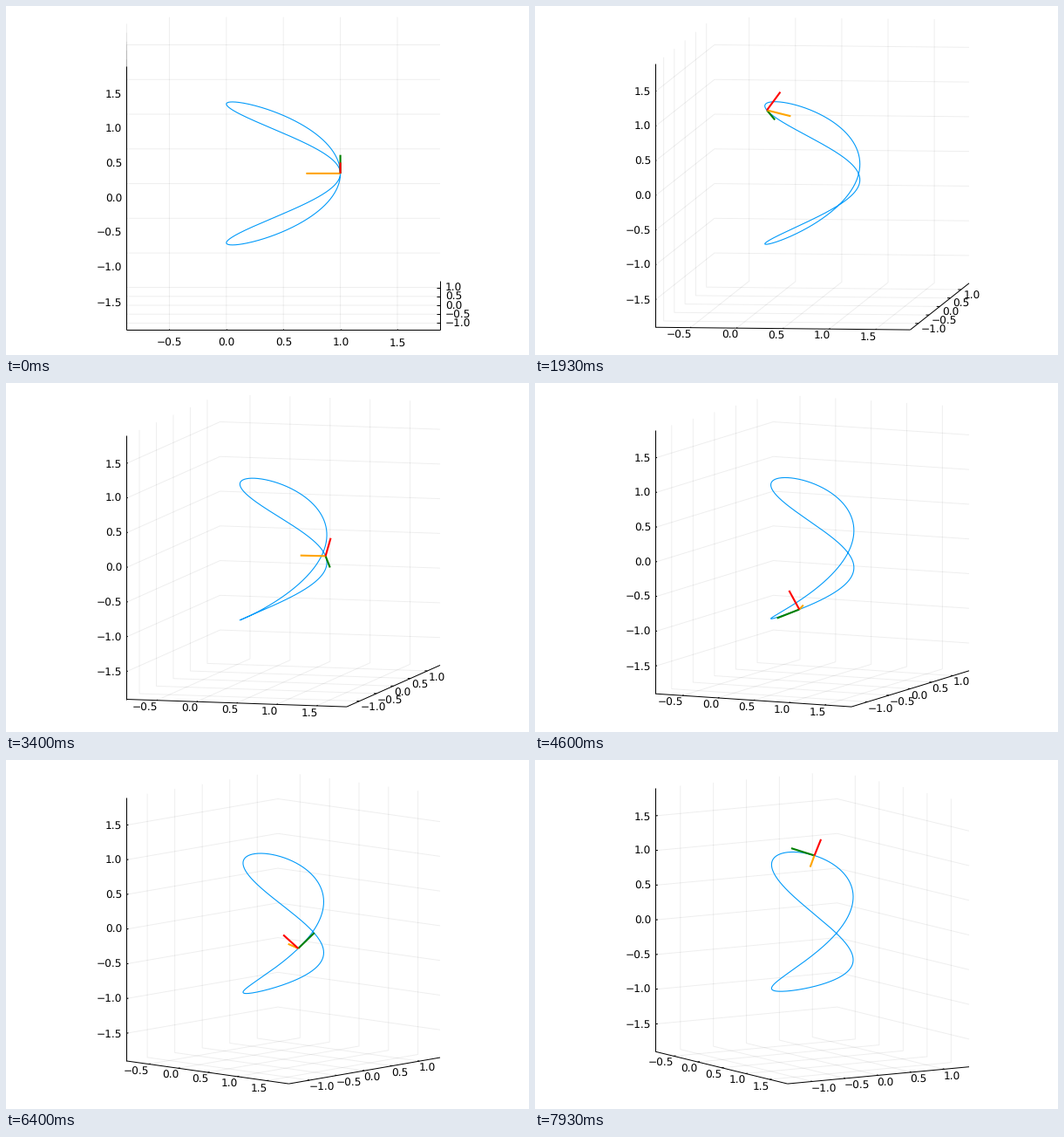
These frames come from a looping animation (600 by 400 pixels, 8000 ms). A matplotlib script:

```python
import numpy as np
import matplotlib.pyplot as plt
from matplotlib.animation import FuncAnimation
from matplotlib.collections import LineCollection

W, H, DPI = 600, 400, 100
LOOP, TICK = 8000, 20           # ms
POSES = 120                     # distinct poses shown in one loop
FULL = 199                      # steps of the complete quarter turn
LO = np.array([-0.875, -1.375, -1.9])
HI = np.array([1.875, 1.375, 1.9])
LEFT, RIGHT, BOTTOM = 138.4, 498.0, 371.1
DEPTH, RISE = 56.2, 302.2       # pixel heights of the floor and of the z axis
FONT = 12.1
TICKS = [np.arange(-1, 4) / 2, np.arange(-2, 3) / 2, np.arange(-3, 4) / 2]

plt.rcParams["font.family"] = "DejaVu Sans"
plt.rcParams["text.hinting"] = "none"


def px(n):
    return n * 72 / DPI


def project(pts, az):
    u = (np.asarray(pts, float) - LO) / (HI - LO)
    x, y, z = u[..., 0], u[..., 1], u[..., 2]
    c, s = np.cos(az), np.sin(az)
    sx = LEFT + (RIGHT - LEFT) * (x * c + y * s) / (c + s)
    sy = BOTTOM - DEPTH * (y * c * c + (1 - x) * s * s) - RISE * z
    return np.stack([sx, sy], axis=-1)


def viviani(t):
    return np.stack([0.5 + 0.5 * np.cos(t), 0.5 * np.sin(t), np.sin(t / 2)], axis=-1)


def frenet(t):
    d1 = np.array([-0.5 * np.sin(t), 0.5 * np.cos(t), 0.5 * np.cos(t / 2)])
    d2 = np.array([-0.5 * np.cos(t), -0.5 * np.sin(t), -0.25 * np.sin(t / 2)])
    tangent = d1 / np.linalg.norm(d1)
    binormal = np.cross(d1, d2)
    binormal /= np.linalg.norm(binormal)
    return tangent, np.cross(binormal, tangent), binormal


(x0, y0, z0), (x1, y1, z1) = LO, HI
GRID = ([[(x, y0, z0), (x, y1, z0), (x, y1, z1)] for x in TICKS[0]]
        + [[(x1, y, z0), (x0, y, z0), (x0, y, z1)] for y in TICKS[1]]
        + [[(x0, y0, z), (x0, y1, z), (x1, y1, z)] for z in TICKS[2]])
AXES = [[(x0, y0, z0), (x1, y0, z0)],
        [(x1, y0, z0), (x1, y1, z0)],
        [(x0, y0, z0), (x0, y0, z1)]]
dx, dy = 0.012 * (x1 - x0), 0.012 * (y1 - y0)
MARKS = ([[(x, y0, z0), (x, y0 + dy, z0)] for x in TICKS[0]]
         + [[(x1, y, z0), (x1 - dx, y, z0)] for y in TICKS[1]]
         + [[(x0, y0, z), (x0, y0 + dy, z)] for z in TICKS[2]])
CURVE = viviani(np.linspace(0, 4 * np.pi, 500))

fig = plt.figure(figsize=(W / DPI, H / DPI), dpi=DPI, facecolor="white")
ax = fig.add_axes([0, 0, 1, 1])
ax.set_xlim(0, W)
ax.set_ylim(H, 0)
ax.axis("off")


def add_lines(width, color, order, **kw):
    lines = LineCollection([], linewidths=px(width), colors=color, zorder=order, **kw)
    ax.add_collection(lines, autolim=False)
    return lines


grid = add_lines(1, "black", 1, alpha=0.065)
grid.set_snap(False)
axes = add_lines(1, "black", 2)
marks = add_lines(1, "black", 2)
curve, = ax.plot([], [], color="#009AFA", lw=px(1.1), zorder=3)
arrows = [ax.plot([], [], color=c, lw=px(2.1), solid_capstyle="butt",
                  snap=False, zorder=4)[0]
          for c in ("green", "orange", "red")]


def add_labels(values):
    return [ax.text(0, 0, f"{v:.1f}".replace("-", "\u2212"), fontsize=px(FONT),
                    va="baseline", color="black", zorder=5) for v in values]


labels = [add_labels(values) for values in TICKS]


def place(text, x, y, align):
    text.set_ha(align)
    text.set_position((x, y + 0.365 * FONT))


def normal(line):
    d = line[1] - line[0]
    return np.array([-d[1], d[0]]) / np.hypot(*d)


def place_labels(az, edges):
    nx, ny = normal(edges[0]), normal(edges[1])
    for text, v in zip(labels[0], TICKS[0]):
        x, y = project((v, y0, z0), az)
        if az == 0:
            place(text, x + 0.5, y + 14.8, "center")
        else:
            place(text, x + 7.5 * nx[0] + 1.8, y + 7.6 * nx[1], "right")
    for text, v in zip(labels[1], TICKS[1]):
        x, y = project((x1, v, z0), az)
        place(text, x + 8 * ny[0] - 2, y + 7.8 * ny[1], "left")
    for text, v in zip(labels[2], TICKS[2]):
        x, y = project((x0, y0, v), az)
        place(text, x - 5.3, y, "right")


def draw(frame):
    # each pose begins on the last clock tick before it is due
    i = int((frame * TICK + 14) * POSES / LOOP)
    az = np.radians(round(90 * i / FULL))
    t = 8 * np.pi * i / FULL
    edges = project(AXES, az)
    grid.set_segments(project(GRID, az))
    axes.set_segments(edges)
    marks.set_segments(project(MARKS, az))
    curve.set_data(*project(CURVE, az).T)
    p = viviani(t)
    for line, v in zip(arrows, frenet(t)):
        line.set_data(*project([p, p + 0.3 * v], az).T)
    place_labels(az, edges)
    return [grid, axes, marks, curve, *arrows, *sum(labels, [])]


anim = FuncAnimation(fig, draw, frames=LOOP // TICK, interval=TICK,
                     repeat=True, repeat_delay=0, blit=False)
plt.show()
```
